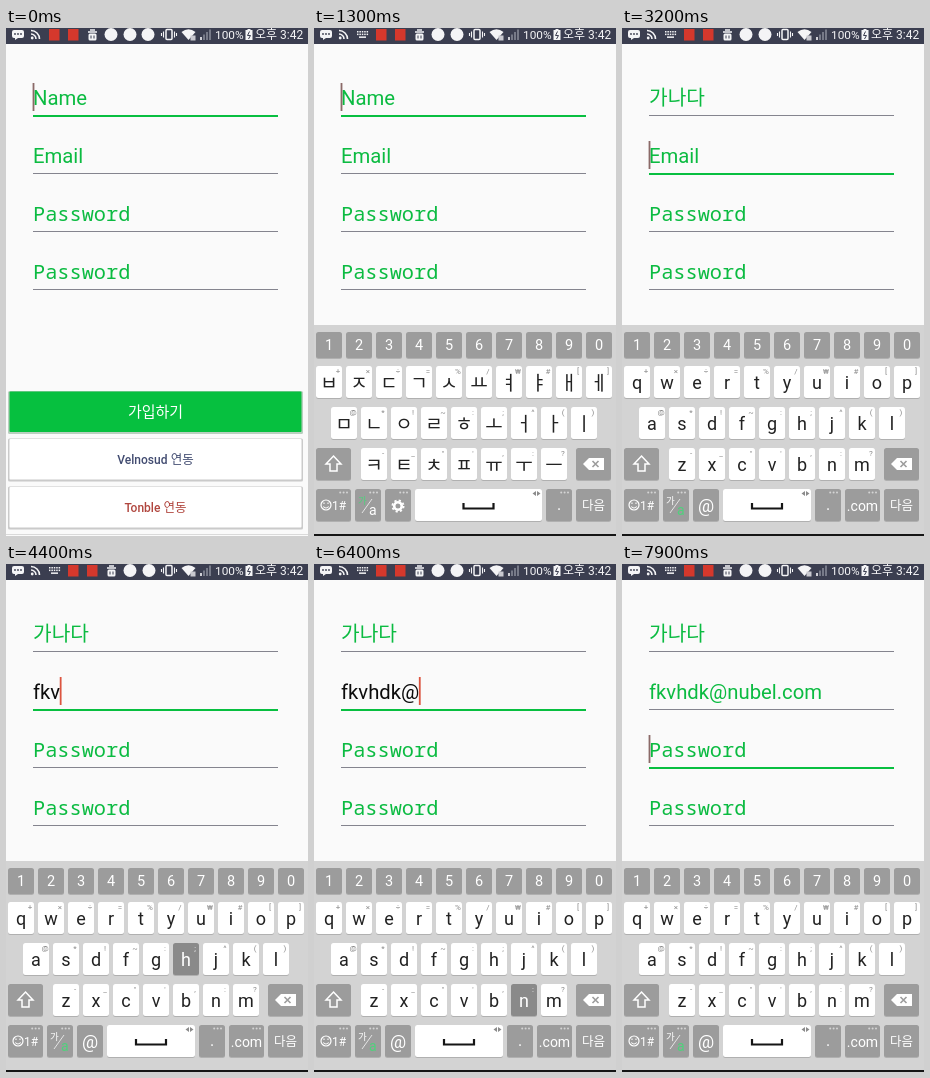
These frames come from a looping animation (302 by 508 pixels, 8 s). An HTML page:

```html
<!DOCTYPE html>
<html lang="ko">
<head>
<meta charset="utf-8">
<title>Sign up</title>
<style>
  html, body { margin: 0; width: 100%; height: 100%; overflow: hidden; background: #fafafa; }
  svg { display: block; width: 302px; height: 508px; }
  text { font-family: Roboto, "Noto Sans CJK KR", "Noto Sans CJK", sans-serif; white-space: pre; }
  .field { font-size: 20.3px; fill: #0bbb41; }
  .field.secret { font-family: "Noto Sans Mono", "DejaVu Sans Mono", monospace; }
  .field.typing { fill: #0c0c0c; }
  .mid { text-anchor: middle; }
  .line { fill: #84848e; }
  .line.focus { fill: #08bf40; }
  .shade { fill: #b0b0b0; }
  .key rect.face { fill: #fff; }
  .key text { fill: #222; }
  .key.dark .face { fill: #9c9c9c; }
  .key.dark text { fill: #fff; }
  .key .hint { fill: #8b8b8b; font-size: 8px; text-anchor: middle; }
  .key.down .face { fill: #8a8a8a; }
  .key.down text { fill: #fff; }
  .key.dark.down .face { fill: #747474; }
  .key .on { fill: #4fd17c !important; }
</style>
</head>
<body>
<svg id="stage" viewBox="0 0 302 508"></svg>
<script>
const NS = 'http://www.w3.org/2000/svg';
const stage = document.getElementById('stage');

function el(parent, tag, attrs = {}, text) {
  const node = document.createElementNS(NS, tag);
  for (const k in attrs) node.setAttribute(k, attrs[k]);
  if (text !== undefined) node.textContent = text;
  return parent.appendChild(node);
}
const group = (p, attrs) => el(p, 'g', attrs);
const rect = (p, x, y, width, height, attrs) => el(p, 'rect', { x, y, width, height, ...attrs });
const label = (p, x, y, text, attrs) => el(p, 'text', { x, y, ...attrs }, text);
const path = (p, d, attrs) => el(p, 'path', { d, ...attrs });
const stroke = (color, width) => ({ fill: 'none', stroke: color, 'stroke-width': width });
const show = (node, on) => node.setAttribute('display', on ? 'inline' : 'none');

// --- form ---
rect(stage, 0, 0, 302, 508, { fill: '#fafafa' });
const hints = ['Name', 'Email', 'Password', 'Password'];
const fields = hints.map((hint, i) => ({
  text: label(stage, 27, 77 + 58 * i, hint),
  line: rect(stage, 27, 87 + 58 * i, 245, 1),
  secret: i > 1
}));
const caret = rect(stage, 27, 55, 1.8, 28);

// --- buttons ---
function button(y, fill, shadow) {
  rect(stage, 2, y, 295, 43, { rx: 1.5, fill: shadow });
  rect(stage, 3.5, y + 0.5, 292, 40.5, { rx: 1, fill });
}
button(363, '#06c03f', '#b9cfbf');
label(stage, 149.5, 389, '가입하기', { class: 'mid', fill: '#fff', 'font-size': 15 });
[['Velnosud', 436, '#414b70'], ['Tonble', 484, '#b0463e']].forEach(([name, y, fill]) => {
  button(y - 25.5, '#fff', '#cacaca');
  const t = label(stage, 149.5, y, '', { class: 'mid', fill, 'font-size': 12 });
  el(t, 'tspan', { 'font-weight': 500 }, name);
  el(t, 'tspan', { 'font-size': 12.5 }, ' 연동');
});
rect(stage, 0, 506, 302, 1, { fill: '#dadada' });

// --- keyboard ---
const keyboard = group(stage);
rect(keyboard, 0, 297, 302, 209, { fill: '#d3d3d3' });
rect(keyboard, 0, 506, 302, 2, { fill: '#151515' });

const keyNodes = [];
function key(parent, name, x, y, w, h, dark) {
  const g = group(parent, { class: dark ? 'key dark' : 'key' });
  rect(g, x, y + 1, w, h, { rx: 2.5, class: 'shade' });
  rect(g, x, y, w, h, { rx: 2.5, class: 'face' });
  keyNodes.push({ name, g });
  return g;
}
const dots = (g, right) => {
  for (let i = 0; i < 3; i++) el(g, 'circle', { cx: right - 4 - i * 3.4, cy: 464.5, r: 1, fill: '#d5d5d5' });
};

[...'1234567890'].forEach((d, i) => {
  const g = key(keyboard, d, 2 + 30 * i, 304, 26, 26, true);
  label(g, 15 + 30 * i, 322, d, { class: 'mid', 'font-size': 14.5 });
});

const shift = key(keyboard, 'shift', 2, 420, 35, 32, true);
path(shift, 'M19.5 428 L27 436 H23 V443 H16 V436 H12 Z', stroke('#fff', 1.5));
const back = key(keyboard, 'back', 262, 420, 35, 32, true);
path(back, 'M269 436 L275 430 H290 V442 H275 Z', { fill: '#fff' });
path(back, 'M278.5 433 L284.5 439 M284.5 433 L278.5 439', stroke('#9c9c9c', 1.6));
const symbols = key(keyboard, 'sym', 2, 461, 35, 32, true);
el(symbols, 'circle', { cx: 12, cy: 477, r: 5, ...stroke('#fff', 1.2) });
path(symbols, 'M9.3 478.5 Q12 481.5 14.7 478.5 M10 474.5 v1.5 M14 474.5 v1.5', stroke('#fff', 1.1));
label(symbols, 18, 481.5, '1#', { 'font-size': 12 });
dots(symbols, 37);
const next = key(keyboard, 'next', 262, 461, 35, 32, true);
label(next, 279.5, 482, '다음', { class: 'mid', 'font-size': 12.5 });

function layout(rows, korean) {
  const set = group(keyboard);
  const marks = ['+×÷=%/₩#[]', '@*!~:;^()', '-_"\',:?'];
  rows.forEach((row, r) => [...row].forEach((ch, i) => {
    const x = 2 + 15 * r + (r > 1 ? 15 : 0) + 30 * i, y = 338 + 41 * r;
    const g = key(set, ch, x, y, 26, 32);
    label(g, x + 13, y + (korean ? 24 : 23), ch, { class: 'mid', 'font-size': korean ? 19 : 18 });
    label(g, x + 22, y + 8, marks[r][i], { class: 'hint' });
  }));

  const lang = key(set, 'lang', 41, 461, 26, 32, true);
  label(lang, 44, 475.5, '가', { 'font-size': 9.5, class: korean ? 'on' : '' });
  path(lang, 'M48 485 L58 471', stroke('#e4e4e4', 1));
  label(lang, 55, 487, 'a', { 'font-size': 14, class: korean ? '' : 'on' });
  dots(lang, 67);

  const third = key(set, korean ? 'gear' : '@', 71, 461, 26, 32, true);
  if (korean) {
    el(third, 'circle', { cx: 84, cy: 478, r: 3.8, ...stroke('#fff', 2.6) });
    el(third, 'circle', { cx: 84, cy: 478, r: 5.6, ...stroke('#fff', 1.8), 'stroke-dasharray': '2.2 2.2' });
    dots(third, 97);
  } else {
    label(third, 84, 484, '@', { class: 'mid', 'font-size': 18 });
  }

  const end = korean ? 228 : 189;
  const space = key(set, 'space', 101, 461, end - 101, 32);
  const mid = (101 + end) / 2;
  path(space, `M${mid - 15} 475 v5.5 h30 v-5.5`, stroke('#151515', 2.2));
  path(space, `M${end - 6} 463 v5 l-3.5 -2.5 Z M${end - 5} 463 v5 l3.5 -2.5 Z`, { fill: '#8b8b8b' });

  const dotX = korean ? 232 : 193;
  const dot = key(set, '.', dotX, 461, 26, 32, true);
  label(dot, dotX + 13, 482, '.', { class: 'mid', 'font-size': 16 });
  dots(dot, dotX + 26);
  if (!korean) {
    const com = key(set, '.com', 223, 461, 35, 32, true);
    label(com, 240.5, 483, '.com', { class: 'mid', 'font-size': 14 });
    dots(com, 258);
  }
  return set;
}
const sets = {
  ko: layout(['ㅂㅈㄷㄱㅅㅛㅕㅑㅐㅔ', 'ㅁㄴㅇㄹㅎㅗㅓㅏㅣ', 'ㅋㅌㅊㅍㅠㅜㅡ'], true),
  en: layout(['qwertyuiop', 'asdfghjkl', 'zxcvbnm'], false)
};

const suggest = group(stage);
rect(suggest, 0, 265, 302, 32, { fill: '#f2f2f2' });
rect(suggest, 0, 265, 302, 1, { fill: '#cbcbcb' });
const guess = label(suggest, 149.5, 287, '', { class: 'mid', fill: '#3dbb72', 'font-size': 16 });

// --- status bar ---
rect(stage, 0, 0, 302, 16, { fill: '#3b3e50' });
const white = { fill: '#f4f4f6' };

path(stage, 'M8 2 h8 q2 0 2 2 v4 q0 2 -2 2 h-4 l-3 2 v-2 h-1 q-2 0 -2 -2 v-4 q0 -2 2 -2 Z', white);
[9, 12, 15].forEach(cx => el(stage, 'circle', { cx, cy: 6, r: 0.9, fill: '#3b3e50' }));
path(stage, 'M25 2.5 a8.5 8.5 0 0 1 8.5 8.5 M25 6 a5 5 0 0 1 5 5', stroke('#f4f4f6', 1.6));
el(stage, 'circle', { cx: 26.2, cy: 10, r: 1.4, ...white });

const typingIcon = group(stage);
for (let r = 0; r < 2; r++)
  for (let i = 0; i < 5; i++) rect(typingIcon, 43 + 2.4 * i, 3 + 2.6 * r, 1.5, 1.5, white);
rect(typingIcon, 45, 8.4, 7, 1.5, white);

const apps = group(stage);
[48, 67].forEach(x => rect(apps, x - 5, 1, 10.5, 11.5, { fill: '#d5382c' }));
path(apps, 'M82 4 h9 M84 2 h5', stroke('#f4f4f6', 1.4));
rect(apps, 82.5, 5.5, 8, 7, { rx: 1.5, ...white });
path(apps, 'M85 7.5 v3 M88 7.5 v3', stroke('#3b3e50', 1));
[105, 124].forEach(cx => el(apps, 'circle', { cx, cy: 6.5, r: 6.5, ...white }));
const lastApp = el(stage, 'circle', { cx: 142, cy: 6.5, r: 6.5, ...white });

rect(stage, 160, 1.5, 6, 10, { rx: 1, ...stroke('#f4f4f6', 1.5) });
path(stage, 'M157.5 3.5 v6 M155.5 5 v3 M168.5 3.5 v6 M170.5 5 v3', stroke('#f4f4f6', 1.1));
path(stage, 'M175.5 4 Q182.5 -1.5 189.5 4 L182.5 12 Z', white);
rect(stage, 184.5, 7.5, 5, 5, { fill: '#c9c9d0' });
for (let i = 0; i < 4; i++)
  rect(stage, 194 + 3 * i, 9 - 2.5 * i, 2, 3 + 2.5 * i, { fill: i ? '#777a88' : '#d0d0d6' });
label(stage, 209, 11, '100%', { 'font-size': 11.8, ...white });
path(stage, 'M241.5 1 h3 v1 h2 v10 h-7 v-10 h2 Z', white);
path(stage, 'M243.5 3.5 l-2 4 h3 l-2 3.5', stroke('#3b3e50', 1));
label(stage, 249, 11, '오후 3:42', { 'font-size': 12, ...white });

// --- timeline: each step changes part of the state ---
const user = 'fkvhdk', site = '@nubel';
const ko = (name, key = '') => ({ name, key, guess: name, caret: true });
const mail = (n, key = '') => ({ mail: (user + site + '.com').slice(0, n), key, caret: true });
const steps = [
  [0, { focus: 0, name: '', mail: '', key: '', guess: '', caret: true, board: '', drop: 0, icon: false }],
  [400, { caret: false }],
  [800, { caret: true }],
  [900, { icon: true }],
  [1200, { board: 'ko', drop: 70 }],
  [1300, { drop: 0 }],
  [1700, { key: 'ㄱ' }],
  [1800, ko('ㄱ')],
  [1900, ko('ㄱ', 'ㅏ')],
  [2000, ko('가')],
  [2100, ko('가', 'ㄴ')],
  [2200, ko('간')],
  [2400, ko('가나')],
  [2600, ko('가낟')],
  [2900, ko('가나다')],
  [3100, { key: 'next' }],
  [3200, { focus: 1, key: '', guess: '', board: 'en' }],
  [3700, { caret: false }],
  [4000, mail(0, user[0])],
  [4100, mail(1)],
  [4200, mail(1, user[1])],
  [4300, mail(2, user[2])],
  [4400, mail(3, user[3])],
  [4500, mail(4)],
  [4600, mail(4, user[4])],
  [4700, mail(5, user[5])],
  [4900, mail(6)],
  [5500, { caret: false }],
  [5800, mail(6, '@')],
  [5900, mail(7)],
  [6400, mail(7, site[1])],
  [6500, mail(8)],
  [6600, mail(8, site[2])],
  [6700, mail(9)],
  [6800, mail(9, site[3])],
  [6900, mail(10, site[4])],
  [7000, mail(11, site[5])],
  [7100, mail(12)],
  [7300, mail(12, '.com')],
  [7400, mail(16, '.com')],
  [7500, mail(16)],
  [7800, { key: 'next' }],
  [7900, { focus: 2, key: '' }]
];
let state = {};
const states = steps.map(([at, change]) => ({ at, ...(state = { ...state, ...change }) }));

function render(s) {
  const values = [s.name, s.mail, '', ''];
  fields.forEach((f, i) => {
    const active = i === s.focus;
    f.text.textContent = values[i] || hints[i];
    f.text.setAttribute('class', 'field' + (f.secret ? ' secret' : '') + (active && values[i] ? ' typing' : ''));
    f.line.setAttribute('class', active ? 'line focus' : 'line');
    f.line.setAttribute('height', active ? 2 : 1);
  });

  const value = values[s.focus];
  const width = value ? fields[s.focus].text.getComputedTextLength() : 0;
  caret.setAttribute('x', 26.6 + width);
  caret.setAttribute('y', 55 + 58 * s.focus);
  caret.setAttribute('fill', value ? (s.focus ? '#dc5540' : '#e0587c') : '#8b6a68');
  show(caret, s.caret);

  show(keyboard, s.board);
  keyboard.setAttribute('transform', `translate(0 ${s.drop})`);
  for (const name in sets) show(sets[name], s.board === name);
  keyNodes.forEach(k => k.g.classList.toggle('down', k.name === s.key));
  show(suggest, s.guess);
  guess.textContent = s.guess;

  show(typingIcon, s.icon);
  show(lastApp, !s.icon);
  apps.setAttribute('transform', `translate(${s.icon ? 19 : 0} 0)`);
}

let shown;
function frame() {
  const t = performance.now() % 8000;
  const s = states.findLast(x => x.at <= t);
  if (s !== shown) render(shown = s);
  requestAnimationFrame(frame);
}
frame();
</script>
</body>
</html>
```
